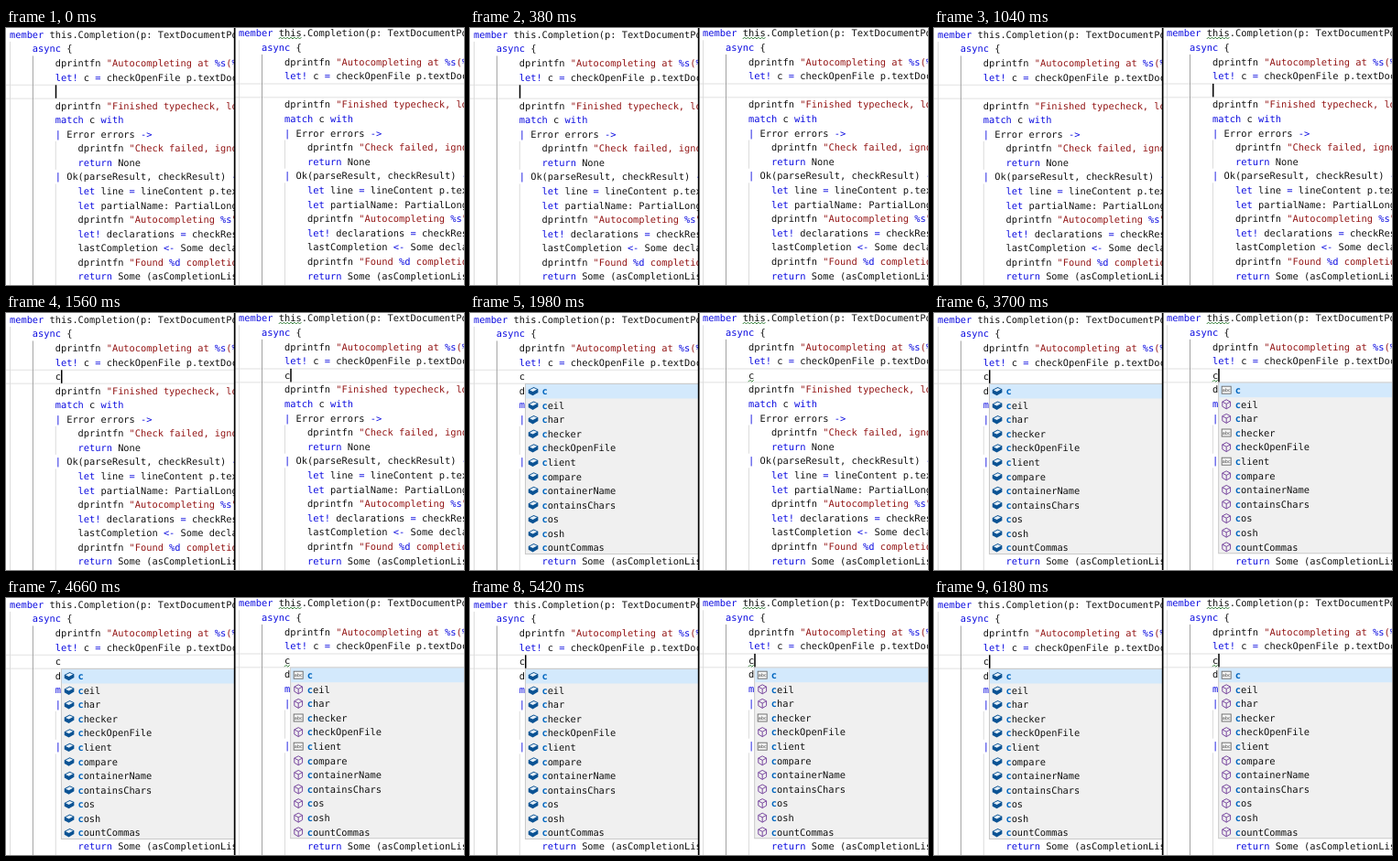
These frames come from a looping animation (500x281 px, 6200 ms). An HTML page:

```html
<!DOCTYPE html>
<html lang="en">
<head>
<meta charset="utf-8">
<title>Code completion side by side</title>
<style>
html, body { margin: 0; width: 100%; height: 100%; overflow: hidden; background: #fff; }
svg { display: block; width: 500px; height: 281px; }
text { font-family: "DejaVu Sans Mono", monospace; white-space: pre; text-rendering: geometricPrecision; }
.abc { font: 5px "DejaVu Sans", sans-serif; }
</style>
</head>
<body>
<svg id="stage" viewBox="0 0 500 281"></svg>
<script>
const LOOP = 6200, BLINK = 600, ADVANCE = 0.602;
const BLUE = '#0c0ce0', RED = '#931515', BLACK = '#111';
const stage = document.getElementById('stage');

const code = [
  'member this.Completion(p: TextDocumentPositionParams)',
  '    async {',
  '        dprintfn "Autocompleting at %s(%d,%d)"',
  '        let! c = checkOpenFile p.textDocument',
  '',
  '        dprintfn "Finished typecheck, looking up"',
  '        match c with',
  '        | Error errors ->',
  '            dprintfn "Check failed, ignored"',
  '            return None',
  '        | Ok(parseResult, checkResult) ->',
  '            let line = lineContent p.textDocument',
  '            let partialName: PartialLongName',
  '            dprintfn "Autocompleting %s" line',
  '            let! declarations = checkResult',
  '            lastCompletion <- Some declarations',
  '            dprintfn "Found %d completions"',
  '            return Some (asCompletionList)',
];
const choices = ['c', 'ceil', 'char', 'checker', 'checkOpenFile', 'client', 'compare',
  'containerName', 'containsChars', 'cos', 'cosh', 'countCommas'];
const locals = ['c', 'checker', 'client'];

function add(parent, tag, attrs, content) {
  const node = document.createElementNS('http://www.w3.org/2000/svg', tag);
  for (const key in attrs) node.setAttribute(key, attrs[key]);
  if (content !== undefined) node.textContent = content;
  parent.appendChild(node);
  return node;
}

const rect = (parent, x, y, width, height, fill) =>
  add(parent, 'rect', { x, y, width, height, fill });
const path = (parent, d, fill, stroke = 'none', width = 1) =>
  add(parent, 'path', { d, fill, stroke, 'stroke-width': width, 'stroke-linejoin': 'round' });

function colorOf(token, inString) {
  if (/^%[sd]$/.test(token)) return BLUE;
  if (inString) return RED;
  return /^(member|async|let!?|match|with|return|->|<-|\||=)$/.test(token) ? BLUE : BLACK;
}

function codeLine(parent, line, x, y, advance) {
  const indent = line.search(/\S/);
  const text = add(parent, 'text', { x: x + indent * advance, y });
  const splitter = /(\b(?:member|async|let!?|match|with|return)(?=\W|$)|->|<-|\||=|%[sd]|")/;
  let inString = false;
  for (const token of line.trim().split(splitter)) {
    if (!token) continue;
    const quote = token === '"';
    add(text, 'tspan', { fill: colorOf(token, inString || quote) }, token);
    if (quote) inString = !inString;
  }
}

function squiggle(parent, x, y, length) {
  let d = `M${x} ${y}`;
  for (let i = 1; i * 1.9 <= length; i++) d += `L${x + i * 1.9} ${y + (i % 2 ? -1.9 : 0)}`;
  return path(parent, d, 'none', '#2f7d35', 1);
}

function solidCube(parent, x, y) {
  path(parent, `M${x - 5.2} ${y - 1.6}l5.8-3 4.8 2.2v3.8l-5.8 3.4-4.8-2.6z`, '#0b5394');
  path(parent, `M${x - 3.9} ${y - 1.3}l4.5-2.3 3.6 1.5-4.5 2.5z`, '#e6f0f8');
}

function outlineCube(parent, x, y) {
  path(parent, `M${x} ${y - 5}l4.4 2.3v5.1l-4.4 2.6-4.4-2.6v-5.1zM${x - 4.4} ${y - 2.7}l4.4 2.3 4.4-2.3M${x} ${y - 0.4}v5.4`,
    'none', '#7a4aa0', 1);
}

function abcBox(parent, x, y) {
  add(parent, 'rect', { x: x - 5, y: y - 4, width: 10, height: 8, fill: '#f6f6f6', stroke: '#666', 'stroke-width': 0.9 });
  add(parent, 'text', { class: 'abc', x, y: y + 1.8, 'text-anchor': 'middle', fill: '#444' }, 'abc');
}

function popup(parent, x, baseline, pitch, outlined) {
  const group = add(parent, 'g', {});
  const top = baseline - 11.8;
  add(group, 'rect', { x: x + 0.5, y: top, width: 250, height: pitch * choices.length - 0.5, fill: '#f0f0f0', stroke: '#c8c8c8' });
  rect(group, x + 1, top + 0.5, 250, pitch, '#d3e9fc');
  choices.forEach((word, i) => {
    const y = baseline + i * pitch;
    const icon = !outlined ? solidCube : locals.includes(word) ? abcBox : outlineCube;
    icon(group, x + 9, y - 3.7);
    const text = add(group, 'text', { x: x + 18.5, y, fill: BLACK });
    add(text, 'tspan', { fill: '#0066bf', 'font-weight': 'bold' }, word[0]);
    add(text, 'tspan', {}, word.slice(1));
  });
  return group;
}

function pane(clipX, width, options) {
  const { id, left, top, size, pitch, outlined } = options;
  const advance = size * ADVANCE;
  const column = n => left + n * advance;
  const baseline = row => top + row * pitch;

  rect(add(stage, 'clipPath', { id }), clipX, 0, width, 281);
  const group = add(stage, 'g', { 'clip-path': `url(#${id})`, 'font-size': size });
  const guide = (n, from, to, fill) =>
    rect(group, column(n), baseline(from) + 4, 1, (to - from) * pitch, fill);

  const lineTop = baseline(4) - 11.4;
  rect(group, clipX, lineTop, width, 1.4, '#e9e9e9');
  rect(group, clipX, lineTop + 14.8, width, 1.4, '#e9e9e9');
  guide(0, 0, 18, '#dcdcdc');
  guide(4, 1, 18, '#a2a2a2');
  guide(8, 7, 9, '#dcdcdc');
  guide(8, 10, 18, '#dcdcdc');
  code.forEach((line, row) => line && codeLine(group, line, left, baseline(row), advance));

  const typed = add(group, 'text', { x: column(8), y: baseline(4), fill: BLACK }, 'c');
  const hint = outlined ? squiggle(group, column(8), baseline(4) + 3.5, 7) : null;
  if (outlined) squiggle(group, column(7), baseline(0) + 2.7, 25);
  const list = popup(group, column(8) + 6.2, baseline(5) + 0.6, pitch, outlined);
  const caret = rect(group, 0, lineTop + 0.6, 1.5, 14.5, '#000');
  return { ...options, column, typed, hint, list, caret };
}

const panes = [
  pane(0, 249, { id: 'before', left: 4, top: 10.9, size: 10.33, pitch: 15.55,
    typeAt: 1240, listAt: 1600, startsOn: true }),
  pane(250, 250, { id: 'after', left: 254, top: 9.3, size: 10.38, pitch: 15.6,
    typeAt: 1280, listAt: 2220, hintAt: 1800, startsOn: false, outlined: true }),
];
rect(stage, 248.8, 0, 1.7, 281, '#000');

const show = (node, visible) => node && node.setAttribute('visibility', visible ? 'visible' : 'hidden');

function caretOn(p, t) {
  if (t >= p.typeAt) return Math.floor((t - p.typeAt) / BLINK) % 2 === 0;
  const phase = Math.floor((t + 80) / BLINK) % 2;
  return (phase === 0) === p.startsOn;
}

function draw(t) {
  for (const p of panes) {
    const typed = t >= p.typeAt;
    show(p.typed, typed);
    show(p.hint, t >= p.hintAt);
    show(p.list, t >= p.listAt);
    show(p.caret, caretOn(p, t));
    p.caret.setAttribute('x', p.column(typed ? 9 : 8));
  }
}

const start = performance.now();
function tick() {
  draw((performance.now() - start) % LOOP);
  requestAnimationFrame(tick);
}
tick();
</script>
</body>
</html>
```
